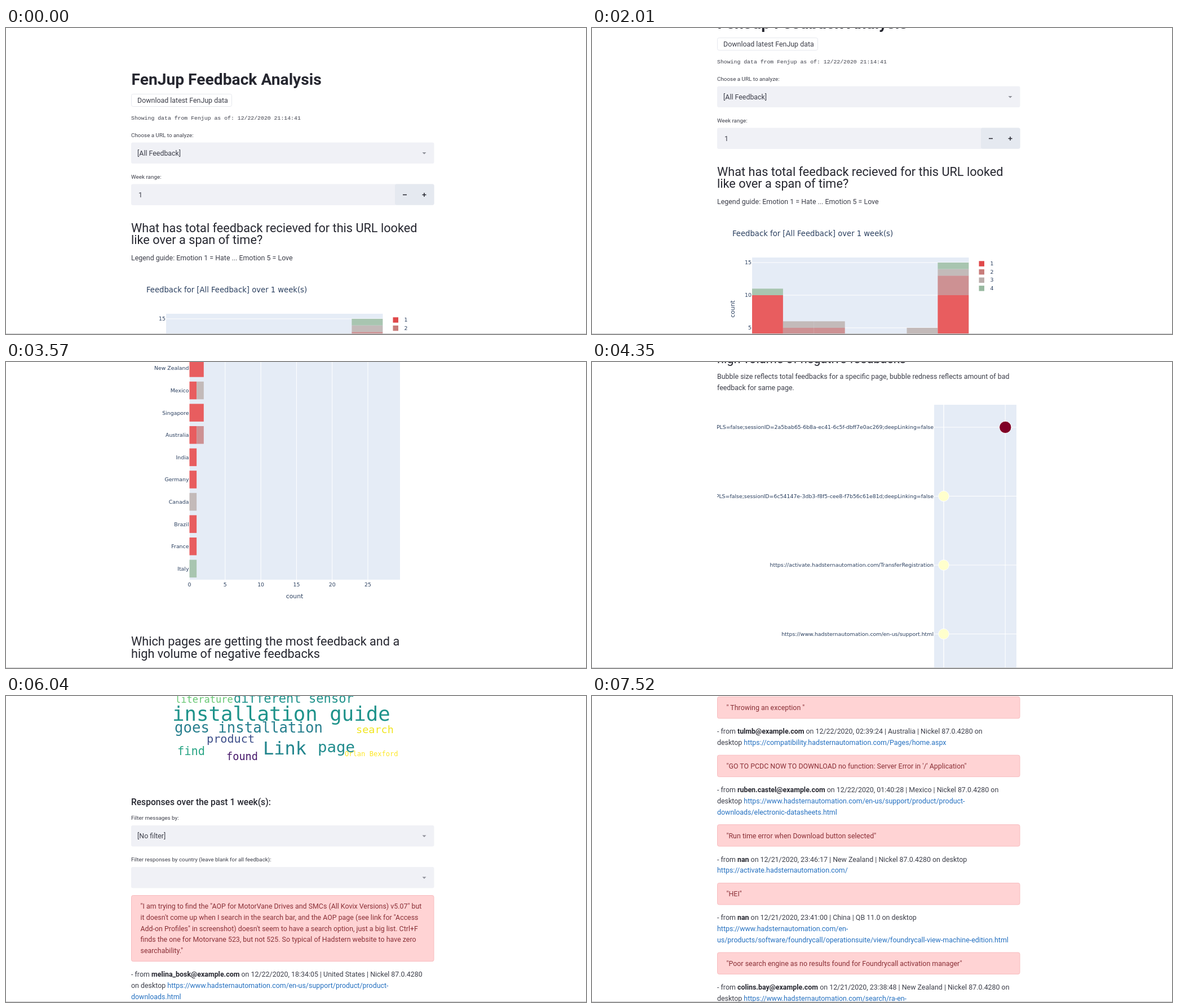
Write an HTML page that moves like this. It is 1029 px wide and 544 px high and loops after 7.68 s.

```html
<!DOCTYPE html>
<html lang="en">
<head>
<meta charset="utf-8">
<title>Feedback Analysis</title>
<style>
html, body { margin: 0; width: 100%; height: 100%; overflow: hidden; background: #fff; }
svg { display: block; }
text { font-family: Roboto, sans-serif; fill: #3d3f4a; white-space: pre; }
.head { fill: #262730; }
.bold { font-weight: 700; fill: #262730; }
.mono { font-family: "Liberation Mono", monospace; }
.plot { font-family: "DejaVu Sans", sans-serif; fill: #2a3f5f; }
.cloud { font-family: "DejaVu Sans Mono", monospace; }
.error { fill: #8a3037; }
.link { fill: #2470c0; }
</style>
</head>
<body>
<svg width="1029" height="544" viewBox="0 0 1029 544">
  <g id="page"></g>
  <path id="cursor" d="M1004.5 534.5V544H1011.5Z" fill="#fff" stroke="#222"/>
  <rect y="543" width="1029" height="1" fill="#cacacc"/>
</svg>
<script>
const LOOP = 7680, SCROLL_START = 1534, STEP = 77.65, LAST_STEP = 77;
const BODY = 12.42, HEADING = 21.7, LINE = 19.7, TICK = 9.4;
const BAR_COLORS = ['#e85d5f', '#cd9193', '#c3bab9', '#a8c5b0'];
const KEY_COLORS = ['#e0484a', '#c87c7a', '#bbaeac', '#98b9a0'];
const PLOT_BG = '#e5ecf6';

// y is the vertical middle of the text
const text = (x, y, str, size = BODY, attrs = '') =>
  `<text x="${x}" y="${y + size * 0.35}" font-size="${size}" ${attrs}>${str}</text>`;
const rect = (x, y, w, h, fill, attrs = '') =>
  `<rect x="${x}" y="${y}" width="${w}" height="${h}" fill="${fill}" ${attrs}/>`;
const section = (top, ...parts) => `<g transform="translate(0 ${top})">${parts.join('')}</g>`;
const list = (items, draw) => items.map(draw).join('');
const range = n => [...Array(n).keys()];

const heading = (x, y, lines, cls = 'head') =>
  list(lines, (s, i) => text(x, y + i * 21.6, s, HEADING, `class="${cls}"`));
const label = (y, str) => text(222, y, str, 9.85);
const plotText = (x, y, str, size = TICK, anchor = 'start', attrs = '') =>
  text(x, y, str, size, `class="plot" text-anchor="${anchor}" ${attrs}`);
const legend = (x, y) => list(KEY_COLORS, (c, i) =>
  rect(x, y - 4.7 + i * 14.6, 9.5, 9.5, c) + plotText(x + 20, y + i * 14.6, i + 1));
const select = (y, str) =>
  rect(222, y, 537.5, 37.5, '#f0f1f6', 'rx="3"') + text(233, y + 19, str) +
  `<path d="M738.5 ${y + 17.5}h7l-3.5 3.5z" fill="#8e9099"/>`;

// stacked segments along an axis: draw(start, size, color)
function stack(counts, draw) {
  let sum = 0;
  return list(counts, (n, i) => {
    sum += n;
    return n ? draw(sum - n, n, BAR_COLORS[i]) : '';
  });
}

function intro() {
  return section(0,
    text(222.5, 91, 'FenJup Feedback Analysis', 28.2, 'class="bold"'),
    rect(222.5, 117.5, 178, 22, '#fff', 'rx="3" stroke="#e6e8ee"'),
    text(233, 128.5, 'Download latest FenJup data'),
    text(222, 160, 'Showing data from Fenjup as of: 12/22/2020 21:14:41', 9.84, 'class="mono"'),
    label(190.5, 'Choose a URL to analyze:'), select(203.5, '[All Feedback]'),
    label(265, 'Week range:'),
    rect(222, 277.5, 537.5, 37.5, '#f0f1f6', 'rx="3"'),
    rect(690, 277.5, 69.5, 37, '#e5e9f0', 'rx="3"'),
    text(235, 296.5, '1'),
    '<path d="M704 296.5h7M738.5 296.5h7M742 293v7" stroke="#262730" stroke-width="1.5"/>',
    heading(222, 355, ['What has total feedback recieved for this URL looked', 'like over a span of time?']),
    text(222, 408.5, 'Legend guide: Emotion 1 = Hate ... Emotion 5 = Love'));
}

function dateChart() {
  const left = 284, day = 54.9, zero = 691, unit = 11.6;
  const days = [[10, 0, 0, 1], [4, 1, 1], [3, 2, 1], [1], [0, 0, 0, 1], [4, 0, 1], [10, 3, 1, 1]];
  const names = ['Wed', 'Thu', 'Fri', 'Sat', 'Sun', 'Mon', 'Tue', 'Wed'];
  return section(0,
    plotText(249, 465, 'Feedback for [All Feedback] over 1 week(s)', 13.2),
    rect(left, 508, 384.5, 183, PLOT_BG),
    list([5, 10, 15], n => rect(left, zero - n * unit - 0.5, 384.5, 1, '#fff')),
    list(days, (counts, i) => stack(counts, (from, n, color) =>
      rect(left + i * day, zero - (from + n) * unit, day, n * unit, color))),
    list([0, 5, 10, 15], n => plotText(283, zero - n * unit, n, TICK, 'end')),
    list(names, (name, i) =>
      `<g transform="translate(${left - 1 + i * day} 698) rotate(30)">${plotText(0, 0, `${16 + i} December (${name})`)}</g>`),
    `<g transform="translate(249 599.5) rotate(-90)">${plotText(0, 0, 'count', 10.8, 'middle')}</g>`,
    plotText(476, 764, 'Date Submitted', 10.8, 'middle'),
    legend(686.5, 519));
}

function countryChart() {
  const left = 325.5, unit = 12.66, row = 39.6;
  const countries = [['United States', 22, 2, 3, 1], ['China', 2, 0, 1], ['New Zealand', 2],
    ['Mexico', 1, 0, 1], ['Singapore', 2], ['Australia', 1, 1], ['India', 1], ['Germany', 1],
    ['Canada', 0, 0, 1], ['Brazil', 1], ['France', 1], ['Italy', 0, 0, 0, 1]];
  return section(523,
    heading(222, 300, ['Which Country is submitting the most feedback? How',
      'do user experiences across countries match up with', 'each other?']),
    plotText(249, 399, 'Breakdown by Country for [All Feedback]', 13.2),
    rect(left, 442, 373.5, 475, PLOT_BG),
    list(range(6), i => rect(left + i * 5 * unit - 0.5, 442, 1, 475, '#fff') +
      plotText(left + i * 5 * unit, 926, i * 5, TICK, 'middle')),
    list(countries, ([name, ...counts], i) =>
      plotText(324.5, 462 + i * row, name, TICK, 'end') +
      stack(counts, (from, n, color) =>
        rect(left + from * unit, 446 + i * row, n * unit, 31.5, color))),
    plotText(512, 946, 'count', 10.8, 'middle'),
    legend(717, 453));
}

function bubbleChart() {
  const site = 'hadsternautomation.com', row = 122.5;
  const pages = [
    ';isPLS=false;sessionID=2a5bab65-6b8a-ec41-6c5f-dbff7e0ac269;deepLinking=false',
    ';isPLS=false;sessionID=6c54147e-3db3-f8f5-cee8-f7b56c61e81d;deepLinking=false',
    `https://activate.${site}/TransferRegistration`,
    `https://www.${site}/en-us/support.html`,
    `https://compatibility.${site}/Pages/home.aspx`,
    `https://activate.${site}/`,
    `https://www.${site}/en-us/company/about-us.html`];
  return section(1577,
    heading(222, -27.6, ['Which pages are getting the most feedback and a', 'high volume of negative feedbacks']),
    text(222, 26, 'Bubble size reflects total feedbacks for a specific page, bubble redness reflects amount of bad'),
    text(222, 45.5, 'feedback for same page.'),
    rect(607, 76, 146, 815, PLOT_BG),
    rect(623.3, 76, 1.4, 815, '#fff'), rect(732.7, 76, 1, 815, '#fff'),
    list(pages, (url, i) => {
      const y = 116 + i * row;
      return rect(607, y - 0.5, 146, 1, '#fff') + plotText(606, y, url, TICK, 'end') +
        `<circle cx="${i ? 624 : 733.3}" cy="${y}" r="${i ? 9.3 : 10.7}" fill="${i ? '#ffffcc' : '#800026'}" stroke="#fff"/>`;
    }),
    rect(0, 76, 222, 815, '#fff'),
    plotText(624, 900, '1', TICK, 'middle'), plotText(733, 900, '2', TICK, 'middle'));
}

function wordCloud() {
  const words = [
    ['download', 300, -66, 38, '#2c728e'], ['error', 500, -70, 30, '#35b779'], ['website', 602, -66, 22, '#443983'],
    ['firmware', 302, -28, 26, '#31688e'], ['release notes', 440, -30, 27, '#3aba76'], ['page', 660, -30, 16, '#481f70'],
    ['literature', 300, 6, 17.1, '#66c772'], ['different sensor', 404, 4, 22.1, '#20938c'],
    ['installation guide', 295, 32, 35.7, '#1f938b'], ['goes installation', 299, 56, 25.7, '#277f8e'],
    ['search', 621, 60, 18.5, '#f1e51d'], ['product', 356, 76, 20.2, '#3e4f8a'],
    ['find', 304, 98, 20.4, '#29a585'], ['found', 391, 107.5, 18.6, '#481a6c'],
    ['Link', 456, 93, 32, '#22858d'], ['page', 553, 90, 27.4, '#218c8d'],
    ['Orlan Bexford', 601, 103, 12.1, '#fde725']];
  return section(2771,
    heading(222, -234, ['What are the most common words used within the', 'feedback for this URL?']),
    list(words, ([word, x, y, size, color]) =>
      text(x, y, word, size, `class="cloud" style="fill:${color}"`)));
}

// "~" starts a link that runs to the end of its line
const metaLine = (y, str) => {
  const [plain, url] = str.split('~');
  return text(222, y, plain + (url ? `<tspan class="link">${url}</tspan>` : ''));
};

function responses() {
  const www = '~https://www.hadsternautomation.com', browser = 'Nickel 87.0.4280';
  const entries = [
    [['"I am trying to find the "AOP for MotorVane Drives and SMCs (All Kovix Versions) v5.07" but',
      'it doesn\'t come up when I search in the search bar, and the AOP page (see link for "Access',
      'Add-on Profiles" in screenshot) doesn\'t seem to have a search option, just a big list. Ctrl+F',
      'finds the one for Motorvane 523, but not 525. So typical of Hadstern website to have zero',
      'searchability."'],
      'melina_bosk@example.com', `12/22/2020, 18:34:05 | United States | ${browser}`,
      `on desktop ${www}/en-us/support/product/product-`, '~downloads.html'],
    [['"The search on the support page does not return the manuals that I am looking for, only',
      'the product brochures."'],
      'tobi.lasker@example.com', `12/22/2020, 15:39:41 | United States | ${browser}`,
      `on desktop ${www}/en-us/support.html?`, '~utm_source=support.hadsternautomation.com&amp;utm_medium=redirect'],
    [['"Why do GlassTray firmware 12 release notes come up blank?"'],
      'drolka@example.com', `12/22/2020, 15:03:49 | United States | ${browser} on`,
      'desktop ~https://compatibility.hadsternautomation.com/GeneratedReleaseNote.aspx?',
      '~v1=59662&amp;v2=59662&amp;o=&amp;pdf=0'],
    [['Runtime Error Description: An exception occurred while processing your request.',
      'Additionally, another exception occurred while executing the custom error page for the first',
      'exception. The request has been terminated. "'],
      'vlin3@ra.example.com', '12/22/2020, 04:11:47 | Singapore | QB 11.0 on desktop',
      `${www}/en-us/company/about-us/contact-us.html`],
    [['" Throwing an exception "'],
      'tulmb@example.com', `12/22/2020, 02:39:24 | Australia | ${browser} on`,
      'desktop ~https://compatibility.hadsternautomation.com/Pages/home.aspx'],
    [['"GO TO PCDC NOW TO DOWNLOAD no function: Server Error in \'/\' Application"'],
      'ruben.castel@example.com', `12/22/2020, 01:40:28 | Mexico | ${browser} on`,
      `desktop ${www}/en-us/support/product/product-`, '~downloads/electronic-datasheets.html'],
    [['"Run time error when Download button selected"'],
      'nan', `12/21/2020, 23:46:17 | New Zealand | ${browser} on desktop`,
      '~https://activate.hadsternautomation.com/'],
    [['"HEI"'],
      'nan', '12/21/2020, 23:41:00 | China | QB 11.0 on desktop', `${www}/en-`,
      '~us/products/software/foundrycall/operationsuite/view/foundrycall-view-machine-edition.html'],
    [['"Poor search engine as no results found for Foundrycall activation manager"'],
      'colins.bay@example.com', `12/21/2020, 23:38:48 | New Zealand | ${browser} on`,
      `desktop ${www}/search/ra-en-`]];
  const bigQuote = ['"Hi I am from technical Support Centre. Why', 'download compatibility center show" Server Error in',
    '\'/\' Application." and Can not download firmware', 'today?'];

  let top = 354;
  const drawEntry = ([message, who, when, ...rest], i) => {
    const quote = i === 3 ? bigQuote : [];
    const textTop = quote.length ? 134 : 20;
    const height = textTop + message.length * LINE - (quote.length ? -0.4 : 0.3);
    const metaTop = top + height + 22.7;
    const meta = [`- from <tspan class="bold">${who}</tspan> on ${when}`, ...rest];
    const out = rect(222.5, top + 0.5, 536.5, height - 1, '#ffd3d4', 'rx="3" stroke="#f8bcbf"') +
      heading(238.5, top + 38, quote, 'error') +
      list(message, (s, j) => text(238.5, top + textTop + j * LINE, s, BODY, 'class="error"')) +
      list(meta, (s, j) => metaLine(metaTop + j * LINE, s));
    top = metaTop + (meta.length - 1) * LINE + 22;
    return out;
  };
  return section(2771,
    text(222, 189, 'Responses over the past 1 week(s):', 15.6, 'class="head" font-weight="500"'),
    label(217, 'Filter messages by:'), select(230, '[No filter]'),
    label(291, 'Filter responses by country (leave blank for all feedback):'), select(304, ''),
    list(entries, drawEntry));
}

const page = document.getElementById('page'), cursor = document.getElementById('cursor');
page.innerHTML = intro() + dateChart() + countryChart() + bubbleChart() + wordCloud() + responses();

// [step, scroll offset, speed per step]
const KEYS = [[-1, 0, 0], [6, 100, 29], [16, 523, 54], [36, 1577, 53], [58, 2771, 54.5], [69, 3376.4, 57], [77, 3850.6, 60]];

function scrollAt(step) {
  const i = Math.max(1, KEYS.findIndex(k => k[0] >= step));
  const [n0, y0, v0] = KEYS[i - 1], [n1, y1, v1] = KEYS[i];
  const span = n1 - n0, s = (step - n0) / span, r = 1 - s;
  return y0 * r * r * (1 + 2 * s) + v0 * span * s * r * r + y1 * s * s * (3 - 2 * s) - v1 * span * s * s * r;
}

function draw() {
  const t = performance.now() % LOOP;
  const step = Math.max(-1, Math.min(LAST_STEP, Math.floor((t - SCROLL_START) / STEP)));
  page.setAttribute('transform', `translate(0 ${-Math.round(scrollAt(step))})`);
  cursor.style.display = t >= 70 && t < 150 ? '' : 'none';
  requestAnimationFrame(draw);
}
draw();
</script>
</body>
</html>
```
